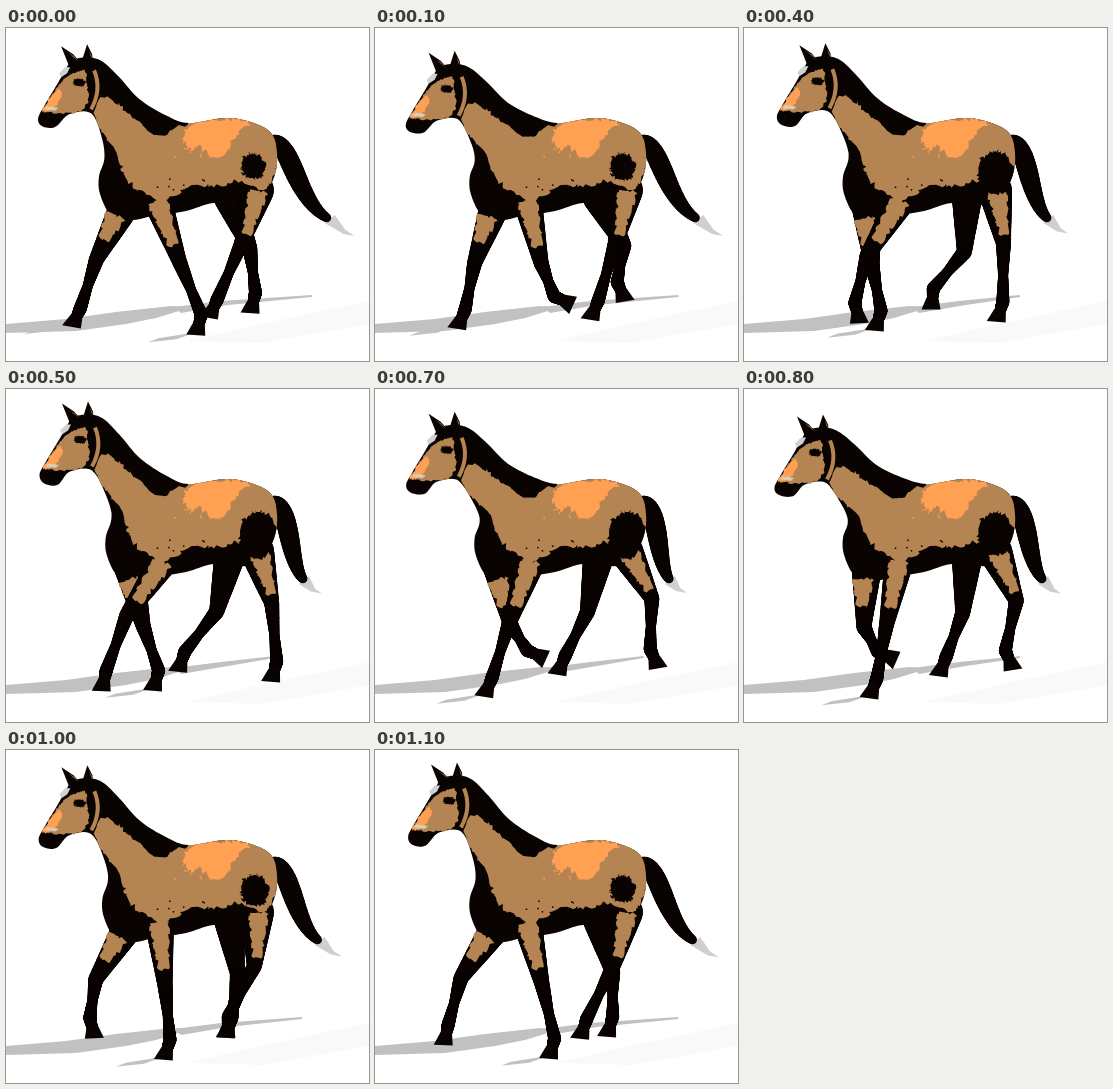
Recreate the animation shown at these times as an HTML page with a canvas. Size 363 px wide and 333 px high, loop 1200 ms.

```html
<!DOCTYPE html>
<html lang="en">
<head>
<meta charset="utf-8">
<title>Walking horse</title>
<style>
html, body { margin: 0; width: 100%; height: 100%; overflow: hidden; background: #fff; }
canvas { display: block; }
</style>
</head>
<body>
<canvas id="stage" width="363" height="333"></canvas>
<script>
const ctx = document.getElementById('stage').getContext('2d');
const BLACK = '#090301', TAN = '#b58453', ORANGE = '#ffa052', GREY = '#c1c1c3';
const STEPS = 12, STEP_MS = 100, LIFT_OFF = 6.6, LANDING = 11.5;

// reach: sole x at landing and lift-off; swing: upper-leg angle at both ends.
const front = { reach: [66, 173], ground: 299, lift: 32, curl: 1.5, swing: [-0.6, 0.35], lead: 0.8, upper: 59 };
const hind = { reach: [170, 252], ground: 284, lift: 12, curl: 0.7, swing: [-0.28, 0.5], lead: -0.3, upper: 54 };
const legs = {
  farFront: { ...front, hip: [118, 179], top: 15, phase: 0, dx: 0, dy: 0 },
  nearFront: { ...front, hip: [153, 177], top: 14, phase: 6, dx: 27, dy: 7 },
  farHind: { ...hind, hip: [223, 170], top: 15, phase: 6, dx: 0, dy: 0 },
  nearHind: { ...hind, hip: [251, 162], top: 17, phase: 0, dx: 33, dy: 6 }
};

const body = pts(`65,30 80,27 95,31 112,47 133,70 160,87 183,95 225,90 262,102 271,125 267,152
  250,176 208,175 180,183 147,188 125,192 105,187 94,166 93,148 98,130 95,108 84,83 62,84
  48,97 35,96 31,88 38,74 50,54 58,40`);
const ears = [pts('54,16 66,24 76,35 62,36'), pts('80,14 85,24 86,33 74,33')];
const coat = pts(`87,84 97,66 124,85 150,107 172,99 196,92 225,87 262,99 274,120 268,150 255,161
  232,153 215,158 185,158 168,168 150,171 122,153 111,125 98,105`);
const glow = pts('181,100 200,92 243,93 230,108 217,129 203,127 192,118 182,121 177,111');
const face = pts('55,50 68,42 78,40 80,56 82,68 74,80 60,83 42,82 35,80 46,64');
const blaze = pts('49,60 54,61 52,71 43,80 36,79');

let warp;

function pts(text) {
  return text.trim().split(/\s+/).map(p => p.split(',').map(Number));
}
function clamp(v) { return Math.max(0, Math.min(1, v)); }
function lerp(a, b, u) { return a + (b - a) * u; }
function mix(a, b, u) { return a.map((v, i) => lerp(v, b[i], u)); }
function wave(step, period, shift) { return Math.cos(2 * Math.PI * (step - shift) / period); }
function polar([x, y], angle, r) { return [x + r * Math.sin(angle), y + r * Math.cos(angle)]; }
function noise(n) {
  const v = Math.sin(n * 127.1 + 11.7) * 43758.5453;
  return v - Math.floor(v);
}

// Closed curve through the points.
function smooth(points) {
  const n = points.length, out = [];
  points.forEach((b, i) => {
    const a = points[(i + n - 1) % n], c = points[(i + 1) % n], d = points[(i + 2) % n];
    for (let u = 0; u < 1; u += 0.125) {
      out.push(b.map((p, k) => p + u / 2 * (c[k] - a[k] + u * (2 * a[k] - 5 * p + 4 * c[k] - d[k]
        + u * (3 * (p - c[k]) + d[k] - a[k])))));
    }
  });
  return out;
}
function ragged(points, amount) {
  const out = [];
  points.forEach((a, i) => {
    const b = points[(i + 1) % points.length];
    const n = Math.max(1, Math.round(Math.hypot(b[0] - a[0], b[1] - a[1]) / 2.5));
    for (let j = 0; j < n; j++) {
      out.push(mix(a, b, j / n).map((v, k) => v + (noise(i * 31 + j * 7 + k * 3.3) - 0.5) * amount));
    }
  });
  return out;
}
function oval(cx, cy, rx, ry) {
  return Array.from({ length: 10 }, (_, i) => [cx + rx * wave(i, 10, 0), cy + ry * wave(i, 10, 2.5)]);
}

function trace(points) {
  ctx.beginPath();
  points.forEach(p => ctx.lineTo(p[0], p[1]));
  ctx.closePath();
}
function fill(points, color) {
  trace(points);
  ctx.fillStyle = color;
  ctx.fill();
}
function blotch(points, color, amount) {
  fill(ragged(smooth(points).map(warp), amount), color);
}
function dot([x, y], r) {
  ctx.beginPath();
  ctx.arc(x, y, r, 0, 7);
  ctx.fill();
}
function taper(a, b, ra, rb) {
  ctx.fillStyle = BLACK;
  for (let u = 0; u <= 1; u += 0.025) dot(mix(a, b, u), lerp(ra, rb, u));
}

// Head and chest follow the stride; the barrel and rump stay put.
function makeWarp(step) {
  const nod = wave(step, 6, 1.9), chest = 7 * Math.sin(Math.PI * step / STEPS);
  return ([x, y]) => {
    const head = clamp((175 - x) / 80) * clamp((150 - y) / 60);
    const low = clamp((165 - x) / 60) * clamp((y - 85) / 40);
    return [x + (0.5 - 1.5 * nod) * head + chest * low, y + (5 + 6.5 * nod) * head];
  };
}

// 0 at landing, rising steadily on the ground to 1, easing back in the air.
function airTime(q) { return clamp((q - LIFT_OFF) / (LANDING - LIFT_OFF)); }
function stroke(q) {
  q = (q + STEPS) % STEPS;
  return q < LIFT_OFF ? q / LIFT_OFF : (1 + Math.cos(Math.PI * airTime(q))) / 2;
}
function pose(leg, step) {
  const q = (step + leg.phase) % STEPS, s = stroke(q);
  const air = Math.sin(Math.PI * airTime(q) ** 0.4);
  const sole = [lerp(...leg.reach, s) + leg.dx, leg.ground + leg.dy + 4 * Math.sin(Math.PI * s) - leg.lift * air];
  const lean = -0.42 + 0.2 * s + leg.curl * air;
  const hip = warp(leg.hip);
  const knee = polar(hip, lerp(...leg.swing, stroke(q + leg.lead)), leg.upper);
  return { hip, knee, sole, lean, fetlock: polar(sole, lean, -21), planted: air < 0.01 };
}

function drawLeg(leg, { hip, knee, fetlock, sole, lean }) {
  const shin = mix(knee, fetlock, 0.55), heel = mix(fetlock, sole, 0.45);
  taper(hip, knee, leg.top, 7.5);
  taper(knee, shin, 7.5, 5);
  taper(shin, fetlock, 5, 6.5);
  taper(fetlock, heel, 6.5, 5.5);
  const tilt = lean * Math.min(1, Math.abs(lean));
  const side = (p, a, w) => polar(p, a + Math.PI / 2, w);
  fill([side(heel, lean, -6), side(sole, tilt, -10), side(sole, tilt, 9), side(heel, lean, 6)], BLACK);
}

// Tan area lying along the upper leg.
function thigh({ hip, knee }, from, to, w1, w2, shift) {
  const a = Math.atan2(knee[0] - hip[0], knee[1] - hip[1]) + Math.PI / 2;
  const p = (u, w) => polar(mix(hip, knee, u), a, w + shift);
  fill(ragged([p(from, -w1), p(from, w1), p(to, w2), p(to, -w2)], 3.5), TAN);
}

function drawGround(step, poses) {
  fill(pts('180,313 255,296 363,273 363,296 255,315'), '#f9f9f9');
  fill(pts('0,296 60,291 110,284 165,278 186,279 150,290 120,296 70,303 0,305'), GREY);
  const far = 286 + 20 * wave(step, STEPS, 0);
  fill([[168, 279], [215, 273], [far, 267], [far, 269], [222, 277], [175, 285]], GREY);
  for (const { sole: [x, y], planted } of [poses.farFront, poses.nearFront]) {
    if (planted) fill([[x, y - 3], [x - 38, y + 3], [x - 48, y + 7], [x - 20, y + 4]], GREY);
  }
}

function drawTail(step) {
  const c = wave(step, STEPS, 0.4);
  const end = [310 + 15 * c, 192], tip = [330 + 19 * c, 206 + 2 * c];
  fill([[end[0] - 6, end[1] + 3], [end[0] + 4, end[1] - 5], mix(end, tip, 0.6), tip,
    [tip[0] - 11, tip[1] - 2]], '#cfcfcf');
  ctx.fillStyle = BLACK;
  for (let u = 0; u <= 0.97; u += 0.015) {
    const v = 1 - u, k = [v ** 3, 3 * v * v * u, 3 * v * u * u, u ** 3];
    const x = 265 * k[0] + 285 * k[1] + (285 + 5 * c) * k[2] + end[0] * k[3];
    const y = 112 * (k[0] + k[1]) + 175 * k[2] + end[1] * k[3];
    dot([x, y], 4 + 6 * Math.sin(Math.PI * u ** 0.8));
  }
}

function drawCoat(step, outline) {
  ctx.save();
  trace(outline);
  ctx.clip();
  blotch(coat, TAN, 4);
  blotch(glow, ORANGE, 5);
  const grow = (1 - wave(step, STEPS, 0)) / 2;
  blotch(oval(247 + 6 * grow, 138 + 9 * grow, 12 + 8 * grow, 13 + 12 * grow), BLACK, 4);
  for (let i = 0; i < 20; i++) {
    ctx.fillStyle = i % 2 ? BLACK : ORANGE;
    ctx.fillRect(145 + noise(i) * 70, (i % 2 ? 150 : 118) + noise(i + 50) * 14, 1.5, 1.5);
  }
  ctx.restore();
}

function drawHead() {
  fill(pts('52,43 58,37 63,37 60,43 54,47').map(warp), '#d2d2d2');
  blotch(face, TAN, 2);
  blotch(blaze, ORANGE, 2);
  blotch(oval(44, 78, 6, 2), '#d9cdb4', 2);
  blotch(oval(72, 52, 6, 4), BLACK, 2);
  ears.forEach(ear => {
    const mid = mix(ear[0], ear[2], 0.6);
    fill(ear.slice(0, 3).map(p => warp(mix(mid, p, 0.45))), TAN);
  });
  ctx.strokeStyle = TAN;
  ctx.lineWidth = 4;
  ctx.beginPath();
  ctx.moveTo(...warp([87, 40]));
  ctx.quadraticCurveTo(...warp([95, 59]), ...warp([84, 79]));
  ctx.stroke();
}

function draw(step) {
  warp = makeWarp(step);
  const poses = {};
  for (const name in legs) poses[name] = pose(legs[name], step);
  const outline = smooth(body).map(warp);
  const leg = name => drawLeg(legs[name], poses[name]);

  ctx.fillStyle = '#fff';
  ctx.fillRect(0, 0, 363, 333);
  drawGround(step, poses);
  leg('farHind');
  leg('farFront');
  drawTail(step);
  fill(outline, BLACK);
  ears.forEach(ear => fill(ear.map(warp), BLACK));
  thigh(poses.farFront, 0.18, 0.65, 11, 5, -3);
  leg('nearHind');
  leg('nearFront');
  thigh(poses.nearHind, 0, 0.85, 10, 4, 2);
  thigh(poses.nearFront, -0.1, 0.72, 10, 5, 0);
  drawCoat(step, outline);
  drawHead();
}

function tick() {
  draw(Math.floor(performance.now() / STEP_MS) % STEPS);
  requestAnimationFrame(tick);
}
tick();
</script>
</body>
</html>
```
